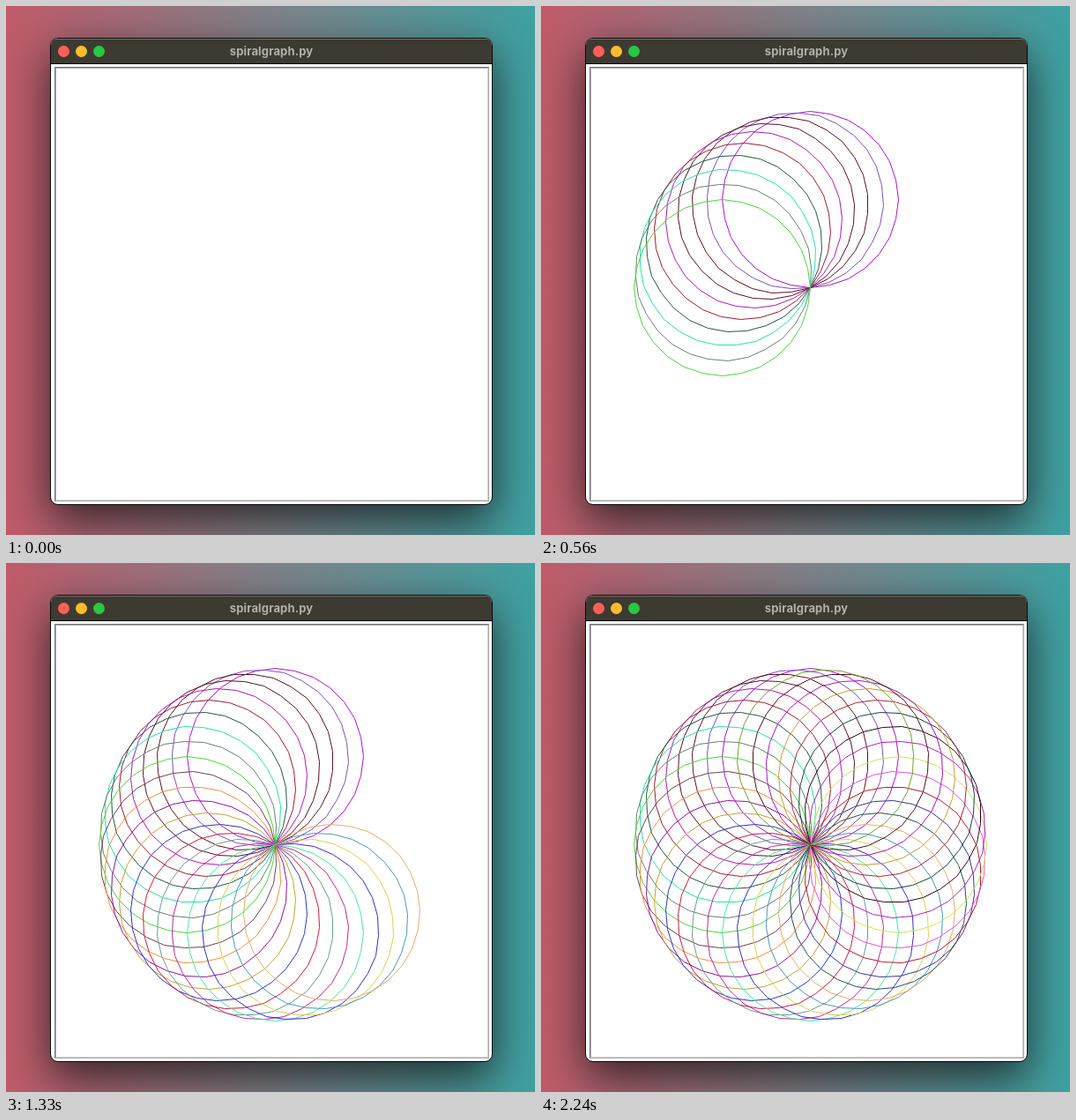
An HTML page with a canvas for the animation above (2.31 s loop, 600 by 600 pixels).

```html
<!DOCTYPE html>
<html lang="en">
<head>
<meta charset="utf-8">
<title>Spiral</title>
<style>
  html, body { margin: 0; width: 100%; height: 100%; overflow: hidden; }
  body { position: relative; background: linear-gradient(90deg, #c05a69, #80838a 50%, #3ea1a2); }
  .window {
    position: absolute; left: 50px; top: 36px; width: 502px; height: 530px;
    box-sizing: border-box; border: 1px solid #0a0a0a; border-radius: 9px;
    overflow: hidden; background: #fff;
    box-shadow: 0 18px 50px rgba(0, 0, 0, .68);
  }
  .bar {
    height: 29px; box-sizing: border-box; background: #3d3a32;
    border-top: 1px solid #77746c; border-bottom: 1px solid #0a0a0a;
    color: #b3b0a9; font: 700 13px/26px Inter, sans-serif;
    letter-spacing: .15px; text-align: center;
  }
  .bar i {
    position: absolute; top: 7.5px; width: 13px; height: 13px; border-radius: 50%;
  }
  .pane {
    position: absolute; left: 4px; top: 32px; width: 491px; height: 491px;
    border: 1px solid; border-color: #777 #aaa #aaa #777;
  }
  .pane::after {
    content: ""; position: absolute; inset: 0;
    border: 1px solid; border-color: #a8a8a8 #ccc #ccc #a8a8a8;
  }
  canvas { position: absolute; left: 0; top: 0; }
</style>
</head>
<body>
<div class="window">
  <div class="bar">
    <i style="left:7.5px;background:#ff5f57"></i>
    <i style="left:27.5px;background:#febc2e"></i>
    <i style="left:47.5px;background:#28c840"></i>
    spiralgraph.py
  </div>
  <div class="pane"></div>
</div>
<canvas width="600" height="600"></canvas>
<script>
const ctx = document.querySelector('canvas').getContext('2d');
const LOOP = 2310, STEP = 70, RADIUS = 100, SIDES = 28, X = 305.5, Y = 319.5;
const colors = (
  'b010d0 7c50c0 601020 581028 b018b8 a81830 205848 20e4ac 688070 48d838 704050 f09040 ' +
  '9010a8 c8a030 2038d0 d81838 68a090 c02898 48e8a0 3828d8 e0d050 4898b8 f0a860 285058 ' +
  '303890 c01828 e050e0 c8e850 b820b8 300818 104840 b02830 c0a030 b010c0 501020 70a030'
).split(' ');

// One circle per step, two at these steps
const doubles = [2, 5, 9, 18];
const countAt = step => step + doubles.filter(d => step >= d).length;

// Polygon circle through the hub, its corners on whole pixels
function drawCircle(n) {
  const heading = -Math.PI / 2 - n * Math.PI / 18;
  ctx.beginPath();
  for (let k = 0; k < SIDES; k++) {
    const a = heading + Math.PI - k * 2 * Math.PI / SIDES;
    const dx = RADIUS * (Math.cos(heading) + Math.cos(a));
    const dy = RADIUS * (Math.sin(heading) + Math.sin(a));
    ctx.lineTo(X + Math.round(dx), Y + Math.round(dy));
  }
  ctx.closePath();
  ctx.strokeStyle = '#' + colors[n];
  ctx.stroke();
}

const start = performance.now();
function render() {
  const time = (performance.now() - start) % LOOP;
  const count = countAt(Math.floor(time / STEP));
  ctx.clearRect(0, 0, 600, 600);
  for (let n = 0; n < count; n++) drawCircle(n);
  requestAnimationFrame(render);
}
render();
</script>
</body>
</html>
```
